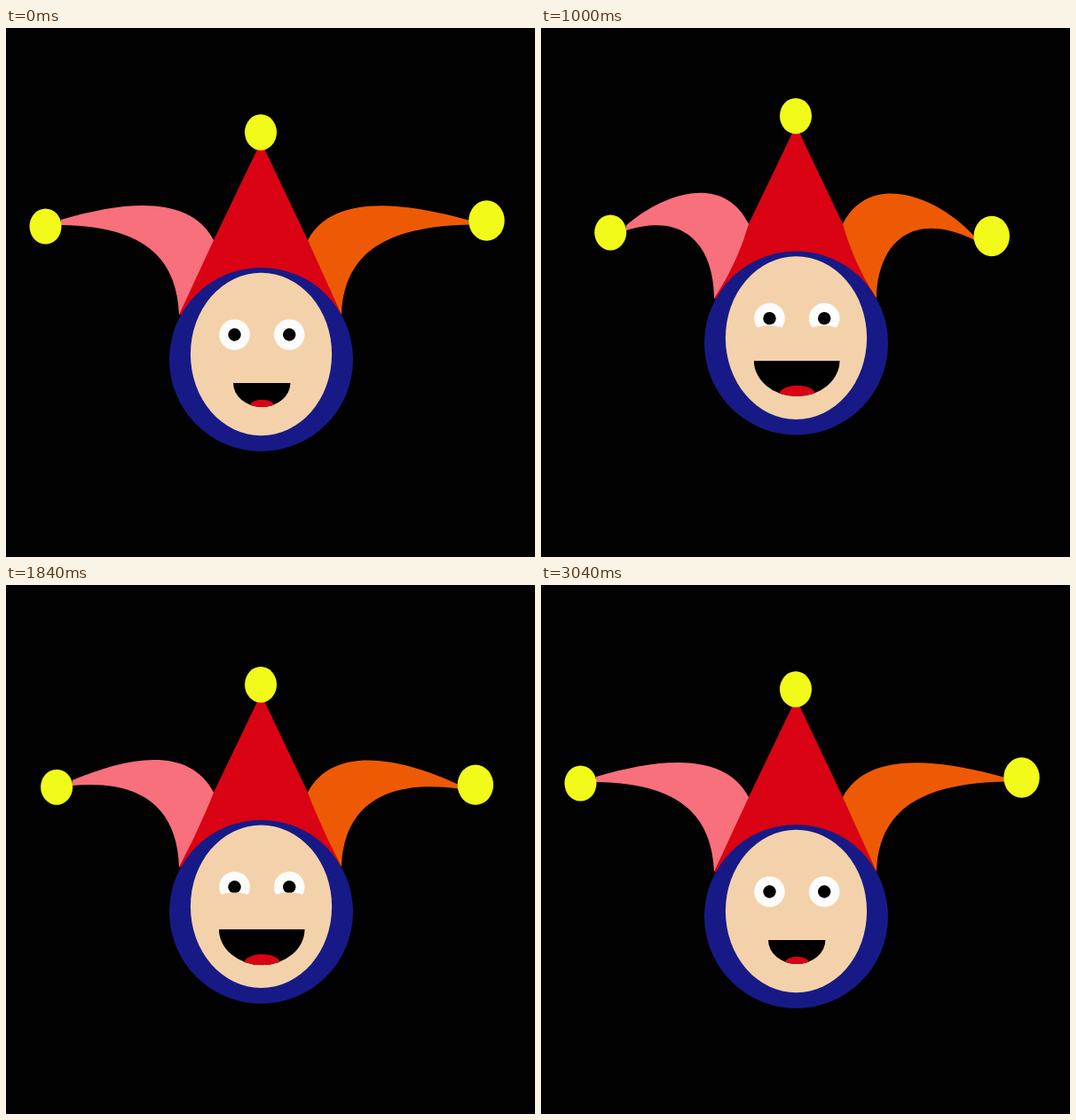
These frames come from a looping animation (596 by 596 pixels, 3.96 s). An HTML page:

```html
<!DOCTYPE html>
<html lang="en">
<head>
<meta charset="utf-8">
<title>Jester</title>
<style>
  html, body { margin: 0; width: 100%; height: 100%; overflow: hidden; background: #020202; }
  svg { display: block; width: 100vw; height: 100vh; }
</style>
</head>
<body>
<svg viewBox="0 0 596 596">
  <defs>
    <clipPath id="lips"><path d="M256 400H320.4A32.2 27 0 0 1 256 400Z"/></clipPath>
  </defs>
  <g id="head">
    <path id="earL" fill="#f7707c"/>
    <path id="earR" fill="#ee5a04"/>
    <path id="hat" fill="#d90314"/>
    <g fill="#f1fa18">
      <ellipse cx="287" cy="117.5" rx="18" ry="20.2"/>
      <ellipse id="bellL" rx="18" ry="20"/>
      <ellipse id="bellR" rx="20.2" ry="22.7"/>
    </g>
    <circle cx="287.5" cy="373.4" r="103.5" fill="#171a86"/>
    <ellipse cx="287.5" cy="367.5" rx="79.6" ry="91.8" fill="#f3d2ab"/>
    <g fill="#fcfcfc">
      <circle cx="257.5" cy="345.5" r="17.3"/>
      <circle cx="319.2" cy="345.5" r="17.3"/>
    </g>
    <circle cx="257.5" cy="345.5" r="7.2"/>
    <circle cx="319.2" cy="345.5" r="7.2"/>
    <g id="lids" fill="#f3d2ab">
      <ellipse cx="257.5" cy="359.5" rx="26" ry="14"/>
      <ellipse cx="319.2" cy="359.5" rx="26" ry="14"/>
    </g>
    <g id="mouth" clip-path="url(#lips)">
      <rect x="250" y="395" width="76" height="40"/>
      <ellipse cx="288.5" cy="425.5" rx="13.5" ry="6.7" fill="#d90314"/>
    </g>
  </g>
</svg>
<script>
const LOOP = 3960, STEP = 40;
const $ = id => document.getElementById(id);

// [time in ms, value], linear in between
const tracks = {
  jump:  [[0, 0], [360, -21], [700, 0], [960, -21], [1280, 0], [1600, -21], [1920, 0]],
  fold:  [[0, 0], [720, 1.02], [2340, 0]],
  lid:   [[0, 20], [1170, 6.2], [2270, 6.2], [3040, 20]],
  smile: [[0, 1], [780, 1.535], [960, 1.5], [2272, 1.5], [3040, 1]]
};

// x, y pairs: upper edge from tip to hat, then lower edge back to the tip
const ears = {
  L: {
    open:   [62, 216, 140, 193, 208, 190, 234, 239, 234, 300, 195, 323, 192, 256, 152, 223, 62, 222],
    folded: [102, 245.5, 134, 209.5, 203, 177.5, 234, 239, 234, 300, 195, 323, 195, 269.5, 168, 224.5, 102, 251],
    bell: [44.5, 223.5, 84.5, 253.5]
  },
  R: {
    open:   [525, 217.5, 439, 193, 366, 190, 340, 239, 340, 300, 378, 322, 381, 256, 424, 223, 525, 221.5],
    folded: [482, 260, 447, 209, 371, 177.5, 340, 239, 340, 300, 378, 322, 378, 269.5, 411, 220, 482, 264],
    bell: [541.5, 217, 501.5, 259.5]
  }
};

const mix = (a, b, k) => a + (b - a) * k;

function at(track, t) {
  for (let i = 1; i < track.length; i++) {
    const [t0, a] = track[i - 1], [t1, b] = track[i];
    if (t < t1) return mix(a, b, (t - t0) / (t1 - t0));
  }
  return track[track.length - 1][1];
}

function drawEar(side, k) {
  const { open, folded, bell } = ears[side];
  const p = open.map((v, i) => mix(v, folded[i], k));
  $('ear' + side).setAttribute('d',
    `M${p.slice(0, 2)}C${p.slice(2, 8)}L${p.slice(8, 12)}C${p.slice(12)}Z`);
  $('bell' + side).setAttribute('cx', mix(bell[0], bell[2], k));
  $('bell' + side).setAttribute('cy', mix(bell[1], bell[3], k));
}

function draw(t) {
  const k = at(tracks.fold, t), s = at(tracks.smile, t);
  drawEar('L', k);
  drawEar('R', k);
  const bend = 8 * k, y = 281 + 3 * k;
  $('hat').setAttribute('d',
    `M287.3 128L234 239Q${214.5 + bend} ${y} 195 323H378Q${359 - bend} ${y} 340 239Z`);
  $('head').setAttribute('transform', `translate(0 ${at(tracks.jump, t)})`);
  $('lids').setAttribute('transform', `translate(0 ${at(tracks.lid, t)})`);
  $('mouth').setAttribute('transform', `translate(288.2 414) scale(${s}) translate(-288.2 -414)`);
}

const start = performance.now();
function tick() {
  const t = (performance.now() - start) % LOOP;
  draw(Math.floor(t / STEP) * STEP);
  requestAnimationFrame(tick);
}
tick();
</script>
</body>
</html>
```
